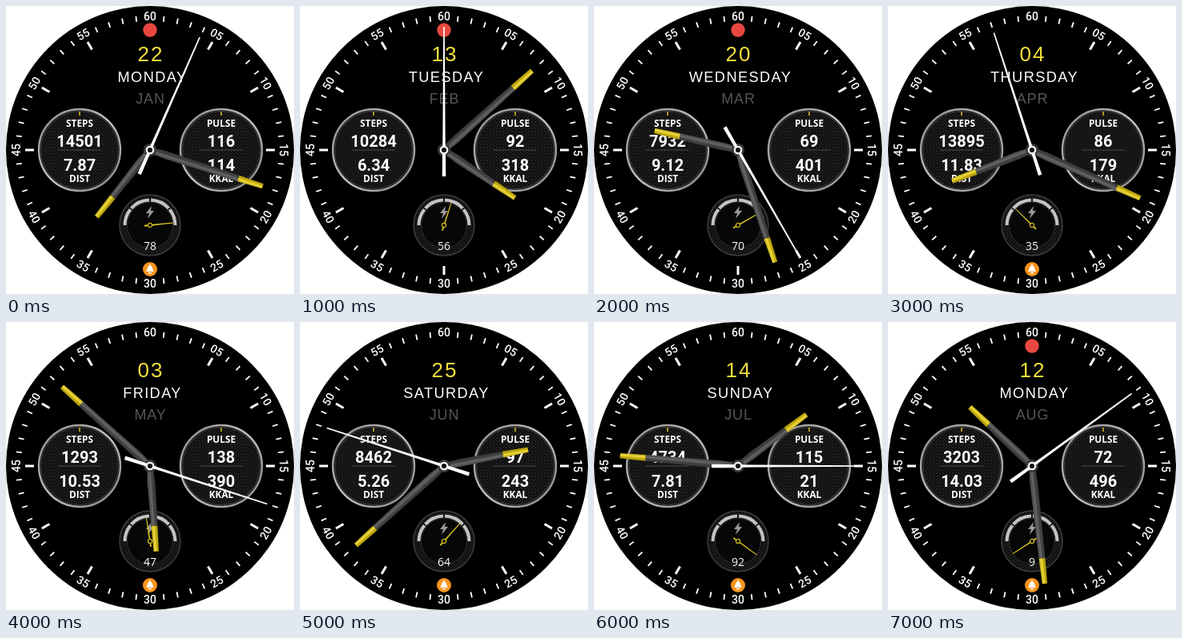
Recreate the animation shown at these times as an HTML page. Size 360 by 360 pixels, loop 8000 ms.

```html
<!DOCTYPE html>
<html lang="en">
<head>
<meta charset="utf-8">
<title>Watch face</title>
<style>
html, body { margin: 0; width: 100%; height: 100%; overflow: hidden; background: #fff; }
svg { display: block; width: 100vw; height: 100vh; }
text { text-anchor: middle; fill: #fff; }
.date { font: 26px "Liberation Sans", Arial, sans-serif; letter-spacing: 2px; fill: #f4e03a; }
.day { font: 18.2px "Liberation Sans", Arial, sans-serif; letter-spacing: 1.4px; }
.month { font: 18px "Liberation Sans", Arial, sans-serif; letter-spacing: .8px; fill: #555; }
.num { font: 600 20px Roboto, sans-serif; }
.cap { font: 700 11.8px "Open Sans", sans-serif; }
.mark { font: 500 14px Roboto, sans-serif; }
.level { font: 14px "Open Sans", sans-serif; }
</style>
</head>
<body>
<svg viewBox="0 0 360 360">
  <defs>
    <pattern id="mesh" width="4" height="4" patternUnits="userSpaceOnUse">
      <rect width="4" height="4" fill="#0d0d0d"/>
      <rect width="2" height="2" fill="#222"/>
      <rect x="2" y="2" width="2" height="2" fill="#1c1c1c"/>
    </pattern>
    <linearGradient id="rim" x1="0" y1="0" x2="1" y2="1">
      <stop offset="0" stop-color="#8c8c8c"/>
      <stop offset=".5" stop-color="#c4c4c4"/>
      <stop offset="1" stop-color="#858585"/>
    </linearGradient>
    <linearGradient id="steel">
      <stop offset="0" stop-color="#333"/>
      <stop offset=".45" stop-color="#484848"/>
      <stop offset=".55" stop-color="#686868"/>
      <stop offset="1" stop-color="#424242"/>
    </linearGradient>
    <linearGradient id="gold">
      <stop offset="0" stop-color="#a8930c"/>
      <stop offset=".45" stop-color="#cdb614"/>
      <stop offset=".55" stop-color="#f2df43"/>
      <stop offset="1" stop-color="#bca514"/>
    </linearGradient>
  </defs>
  <circle cx="180" cy="180" r="180"/>
  <g id="scale"></g>
  <text id="date" class="date" x="181" y="69"></text>
  <text id="day" class="day" x="183" y="94.5"></text>
  <text id="month" class="month" x="180.5" y="121.5"></text>
  <g id="dials"></g>
  <g transform="translate(180 274)">
    <circle r="38" fill="url(#mesh)" stroke="#3c3c3c" stroke-width="1.5"/>
    <circle r="28.5" fill="#070707" stroke="#2c2c2c"/>
    <g id="arcs" fill="none"></g>
    <path d="M2-24-5-15H-1L-3-8 5-18H1Z" fill="#999"/>
    <g id="needle">
      <path d="M-.9 7 -.5-29H.5L.9 7Z" fill="#e3cc20"/>
      <circle r="2.6" fill="#111" stroke="#d0ba1c" stroke-width="1.3"/>
    </g>
    <text id="level" class="level" y="31"></text>
  </g>
  <circle id="link" cx="180" cy="30" r="8.7" fill="#e8483f"/>
  <g id="bell" transform="translate(180 329)">
    <circle r="9" fill="#f7941d"/>
    <path d="M-5 3C-3 1.5-3.8-4.6 0-4.6S3 1.5 5 3Z" fill="#fff"/>
    <path d="M0-5.8V-4M-1.5 4.7H1.5" stroke="#fff" stroke-width="1.5" stroke-linecap="round"/>
  </g>
  <g id="hour"></g>
  <g id="minute"></g>
  <circle cx="180" cy="180" r="8" fill="#3a3a3a"/>
  <g id="second"><path d="M-2.3 33-1.6-20-.8-154H.8L1.6-20 2.3 33Z" fill="#fff"/></g>
  <circle cx="180" cy="180" r="4.2" fill="#111" stroke="#fff" stroke-width="2.2"/>
</svg>
<script>
const $ = id => document.getElementById(id);
const STEP = 1000;

// date, day, month, steps, distance, pulse, energy, battery, hour/minute/second angles, link, bell
const states = [
  ["22", "MONDAY", "JAN", "14501", "7.87", "116", "114", 78, 218.5, 107.8, 23.8, 1, 1],
  ["13", "TUESDAY", "FEB", "10284", "6.34", "92", "318", 56, 124, 48, 0, 1, 0],
  ["20", "WEDNESDAY", "MAR", "7932", "9.12", "69", "401", 70, 283, 161.8, 150, 1, 0],
  ["04", "THURSDAY", "APR", "13895", "11.83", "86", "179", 35, 248.8, 114, 342, 0, 1],
  ["03", "FRIDAY", "MAY", "1293", "10.53", "138", "390", 47, 175.8, 312, 108, 0, 1],
  ["25", "SATURDAY", "JUN", "8462", "5.26", "97", "243", 64, 79, 228, 288, 0, 1],
  ["14", "SUNDAY", "JUL", "4734", "7.81", "115", "21", 92, 53, 275, 90, 0, 1],
  ["12", "MONDAY", "AUG", "3203", "14.03", "72", "496", 9, 313.5, 173.8, 54, 1, 1]
];

function drawScale() {
  let out = "";
  for (let i = 0; i < 60; i++) {
    const a = i * 6, major = i % 5 === 0;
    const [y1, y2, w] = major ? [24, 35, 3] : [12, 19, 1.8];
    if (i) out += `<path d="M180 ${y1}V${y2}" stroke="#fff" stroke-width="${w}" transform="rotate(${a} 180 180)"/>`;
    if (!major) continue;
    const r = a * Math.PI / 180;
    const x = 180 + 167 * Math.sin(r), y = 180 - 167 * Math.cos(r);
    const tilt = a > 90 && a < 270 ? a - 180 : a;
    out += `<text class="mark" y="5" transform="translate(${x} ${y}) rotate(${tilt})">${String(i || 60).padStart(2, "0")}</text>`;
  }
  $("scale").innerHTML = out;
}

function dial(x, top, bottom, idA, idB) {
  return `<g transform="translate(${x} 180)">
    <circle r="51" fill="url(#mesh)" stroke="url(#rim)" stroke-width="2.4"/>
    <circle r="48.5" fill="none" stroke="#333" stroke-width="1.5"/>
    <path d="M-27 0H27" stroke="#484848"/>
    <path d="M0-48V-43" stroke="#d8c320" stroke-width="1.5"/>
    <text class="cap" y="-29">${top}</text>
    <text class="num" id="${idA}" y="-4"></text>
    <text class="num" id="${idB}" y="26"></text>
    <text class="cap" y="40">${bottom}</text></g>`;
}

function arc(from, to, r, width, color) {
  const p = a => `${r * Math.sin(a * Math.PI / 180)} ${-r * Math.cos(a * Math.PI / 180)}`;
  return `<path d="M${p(from)}A${r} ${r} 0 0 1 ${p(to)}" stroke="${color}" stroke-width="${width}"/>`;
}

function hand(length) {
  const y = 32 - length;
  return `<path d="M-3.5 0-5-20-4 ${y}H4L5-20 3.5 0Z" fill="url(#steel)"/>
    <path d="M-4 ${y}-3.2 ${-length}H3.2L4 ${y}Z" fill="url(#gold)"/>`;
}

function turn(id, angle) {
  $(id).setAttribute("transform", `translate(180 180) rotate(${angle})`);
}

function show(state) {
  const [date, day, month, steps, dist, pulse, energy, level, h, m, s, link, bell] = state;
  const texts = { date, day, month, steps, dist, pulse, energy, level };
  for (const id in texts) $(id).textContent = texts[id];
  $("needle").setAttribute("transform", `rotate(${(level - 50) * 3})`);
  turn("hour", h);
  turn("minute", m);
  turn("second", s);
  $("link").style.display = link ? "" : "none";
  $("bell").style.display = bell ? "" : "none";
}

drawScale();
$("dials").innerHTML = dial(92, "STEPS", "DIST", "steps", "dist") + dial(269, "PULSE", "KKAL", "pulse", "energy");
$("arcs").innerHTML = [[-90, -51], [-48, -2], [2, 48], [51, 90]]
  .map(([a, b]) => arc(a, b, 31.5, 4, "#c4c4c4")).join("");
$("hour").innerHTML = hand(107);
$("minute").innerHTML = hand(148);

let shown = -1;
const start = performance.now();
function tick(now) {
  const i = Math.floor(Math.max(0, now - start) / STEP) % states.length;
  if (i !== shown) show(states[shown = i]);
  requestAnimationFrame(tick);
}
tick(start);
</script>
</body>
</html>
```
